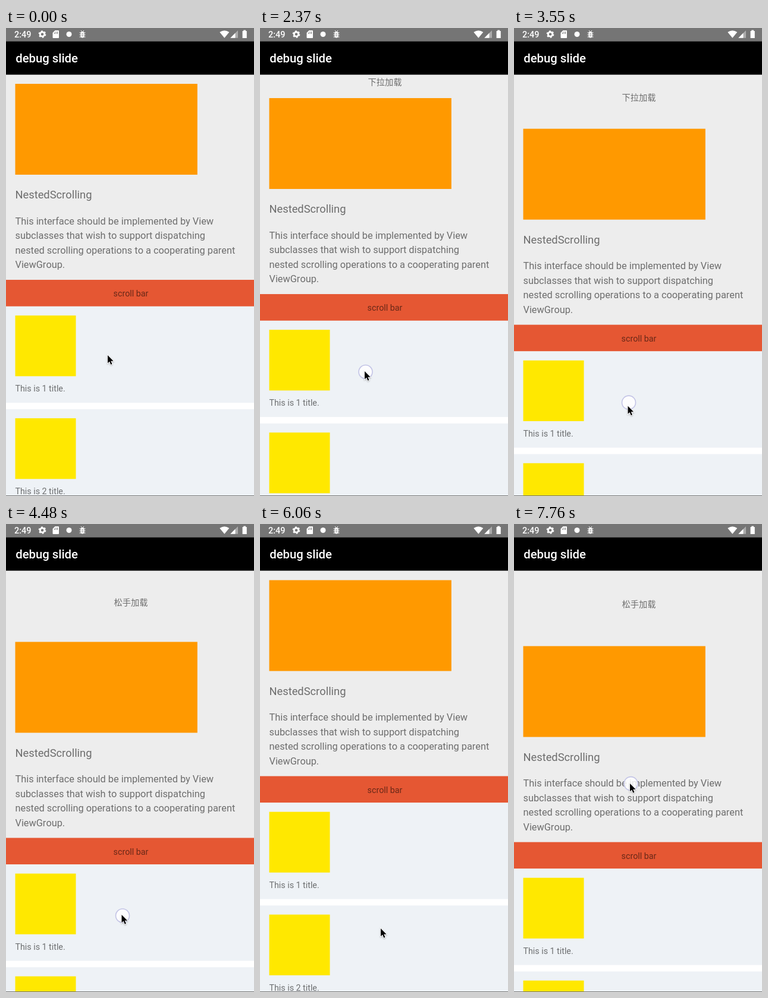
Animation of 417x788 px, one loop 8000 ms. Source, as an HTML page:

```html
<!DOCTYPE html>
<html lang="en">
<head>
<meta charset="utf-8">
<title>debug slide</title>
<style>
  html, body { margin: 0; width: 100%; height: 100%; overflow: hidden; background: #fff; }
  svg { display: block; font-family: Roboto, sans-serif; font-kerning: none; }
  .grey { fill: #000; fill-opacity: .54; }
  .small { font-size: 14.25px; }
  .body { font-size: 16.32px; }
  .medium { font-weight: 500; fill: #fff; }
  .cjk { font-family: "Noto Sans CJK SC", "Noto Sans CJK", sans-serif; font-size: 14.2px; }
  .mid { text-anchor: middle; }
</style>
</head>
<body>
<svg width="417" height="788" viewBox="0 0 417 788">
  <defs>
    <clipPath id="pullClip"><rect id="pullArea" y="79" width="417" height="0"/></clipPath>
    <filter id="shadow" x="-50%" y="-50%" width="200%" height="200%">
      <feDropShadow dx="0" dy="1" stdDeviation="1" flood-opacity=".35"/>
    </filter>
  </defs>

  <rect width="417" height="788" fill="#ededed"/>
  <g clip-path="url(#pullClip)">
    <text id="pullText" class="grey cjk mid" x="210" lang="zh-CN"></text>
  </g>

  <g id="content">
    <rect x="15.5" y="94" width="306.3" height="153" fill="#ff9900"/>
    <text class="grey" x="15.5" y="287" font-size="18.3">NestedScrolling</text>
    <g class="grey body">
      <text x="15.5" y="330.5">This interface should be implemented by View</text>
      <text x="15.5" y="355">subclasses that wish to support dispatching</text>
      <text x="15.5" y="379.5">nested scrolling operations to a cooperating parent</text>
      <text x="15.5" y="404">ViewGroup.</text>
    </g>
    <rect y="468" width="417" height="340" fill="#fff"/>
    <rect y="424" width="417" height="44.8" fill="#e55733"/>
    <text class="grey small mid" x="210" y="452">scroll bar</text>
    <g id="items"></g>
  </g>

  <rect y="787" width="417" height="1" fill="#757575"/>
  <rect width="417" height="78.6" fill="#000"/>
  <rect width="417" height="22.6" fill="#757575"/>
  <text class="medium" x="16.2" y="58" font-size="20.3">debug slide</text>
  <text class="medium" x="14" y="15.8" font-size="14.4">2:49</text>

  <g fill="#fff">
    <g fill="none" stroke="#fff">
      <circle cx="61" cy="10.5" r="3.7" stroke-width="2.8"/>
      <circle cx="61" cy="10.5" r="5.4" stroke-width="1.9" stroke-dasharray="2.9 2.755"/>
    </g>
    <path d="M82.5 4H88q1 0 1 1V16q0 1-1 1H79.5q-1 0-1-1V8Z"/>
    <path d="M81.5 7.5v2.5M84 6v4M86.5 6v4" stroke="#757575"/>
    <circle cx="106" cy="10.5" r="4.5"/>
    <rect x="125.5" y="6" width="6" height="10.5" rx="3"/>
    <path d="M126 4l2 2.5M131 4l-2 2.5M123.5 8h10M123.5 11.5h10M123.5 15h10" stroke="#fff"/>
    <path d="M127 10h3M127 13h3" stroke="#757575"/>
    <path d="M359.3 7Q367.3 1.3 375.3 7L367.3 16.7Z"/>
    <path d="M390 4V16.7H377.3Z" opacity=".4"/>
    <path d="M385.5 8.5V16.7H377.3Z"/>
    <path d="M399.3 3.5h3.8v1.4h1.7V17h-7.2V4.9h1.7Z"/>
  </g>

  <circle id="touch" r="11.5" fill="#fff" fill-opacity=".84" stroke="#c3c4e6" stroke-width="1.6"/>
  <path id="cursor" d="M0 0V13.3L3.1 10.5L5.3 15.7L7.4 14.8L5.2 9.8H9.6Z"
        stroke="#fff" stroke-width="1.6" paint-order="stroke" filter="url(#shadow)"/>
</svg>

<script>
const LOOP = 8000;
const READY_PULL = 96;
const $ = id => document.getElementById(id);

const linear = p => p;
const smooth = p => (1 - Math.cos(Math.PI * p)) / 2;

// Each move carries the pull distance and the cursor on from where the last one ended.
const rest = { pull: 0, x: 171, y: 551 };
const moves = [
  { start: 530, end: 1190, pull: 12, x: 173, y: 565, touch: true },
  { start: 1850, end: 2370, pull: 24, x: 176, y: 578, touch: true },
  { start: 2370, end: 3550, pull: 75.6, x: 191.5, y: 636.5, touch: true },
  { start: 3550, end: 4240, pull: 104.5, x: 194.5, y: 658, touch: true },
  { start: 4690, end: 5100, pull: READY_PULL, x: 203, y: 681, ease: smooth },
  { start: 5583, end: 6085, pull: 0, ease: smooth },
  { start: 6085, end: 6350, x: 222, y: 497 },
  { start: 6475, end: 6820, x: 184, y: 324 },
  { start: 7000, end: 7760, pull: 111.6, x: 195, y: 437, touch: true }
];

function poseAt(t) {
  const pose = { ...rest, touch: false };
  for (const move of moves) {
    if (t < move.start) break;
    const p = Math.min(1, (t - move.start) / (move.end - move.start));
    const eased = (move.ease || linear)(p);
    for (const key of ['pull', 'x', 'y']) {
      if (key in move) pose[key] += (move[key] - pose[key]) * eased;
    }
    pose.touch = Boolean(move.touch);
  }
  return pose;
}

$('items').innerHTML = [1, 2].map(n => `
  <g transform="translate(0 ${(n - 1) * 173})">
    <rect y="468.8" width="417" height="162.2" fill="#eef2f6"/>
    <rect x="15.5" y="484.1" width="102" height="102.2" fill="#ffe800"/>
    <text class="grey small" x="15.5" y="612">This is ${n} title.</text>
  </g>`).join('');

function draw(t) {
  const { pull, x, y, touch } = poseAt(t);
  const secondDrag = t > 7000;
  const released = t > 4690 && !secondDrag;

  $('content').setAttribute('transform', `translate(0 ${pull})`);
  $('pullArea').setAttribute('height', pull);
  $('pullText').setAttribute('y', 84.3 + Math.max(10, pull / 2));
  $('pullText').textContent = released || pull >= READY_PULL ? '松手加载' : '下拉加载';
  $('cursor').setAttribute('transform', `translate(${x} ${y})`);
  $('touch').setAttribute('transform', `translate(${x + 1.5} ${pull + (secondDrag ? 325.5 : 555)})`);
  $('touch').setAttribute('visibility', touch ? 'visible' : 'hidden');
}

const begin = performance.now();
function tick() {
  draw((performance.now() - begin) % LOOP);
  requestAnimationFrame(tick);
}
tick();
</script>
</body>
</html>
```
